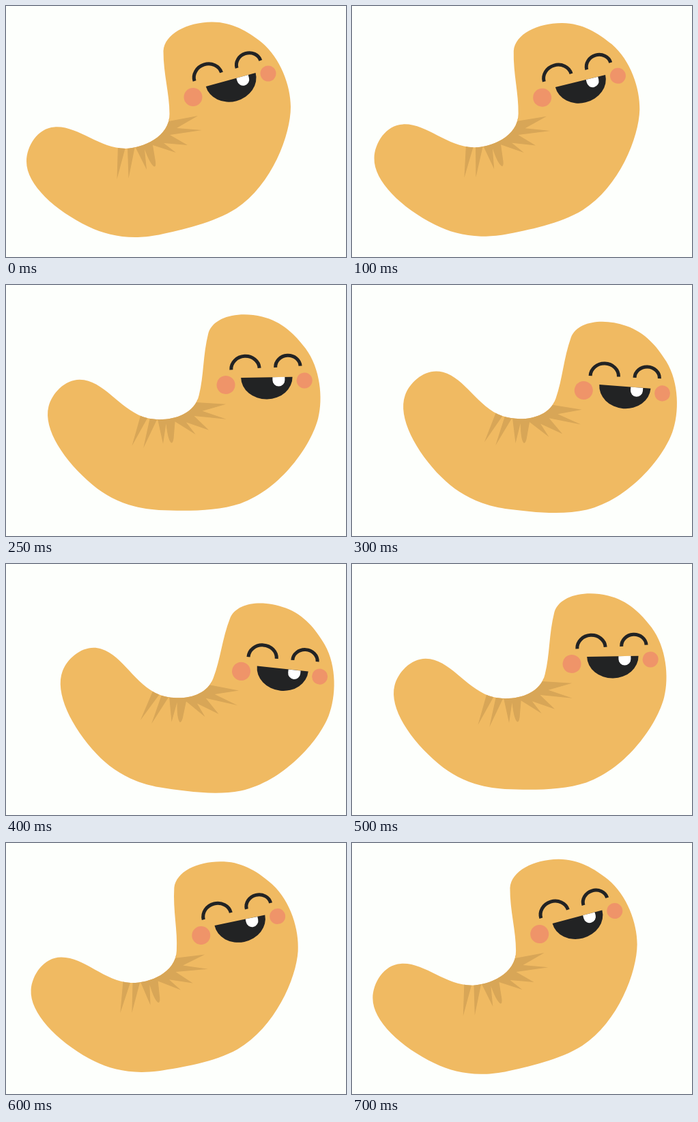
An HTML page for the animation above (0.75 s loop, 498x368 px).

```html
<!DOCTYPE html>
<html lang="en">
<head>
<meta charset="utf-8">
<title>Rocking cashew</title>
<style>
  html, body { margin: 0; width: 100%; height: 100%; overflow: hidden; background: #fdfffc; }
  svg { display: block; width: 100%; height: 100%; }
  .eye { fill: none; stroke: #222324; stroke-width: 5; }
  .cheek { fill: #ef9469; }
</style>
</head>
<body>
<svg viewBox="0 0 498 368">
  <defs>
    <path id="body" d="M230.5 66 C232 41 265 24 301 23.5 C330 23 354 37 374 53
      C402 76 417 117 417 148 C417 188 390 262 337 297 C304 318 258 328 224 335.5
      C210 338 200 339 189 339 C163 339 141 333 121 323.5 C72 300 30 262 30 228
      C30 206 46 179 71 177.5 C105 175 136 209 175 209
      C200 208.5 240 192 239.5 158 C239.5 128 230.5 100 230.5 66Z"/>
    <clipPath id="skin"><use href="#body"/></clipPath>
  </defs>
  <g id="cashew">
    <use href="#body" fill="#f0ba62"/>
    <path clip-path="url(#skin)" fill="#d8a657" d="M164 203 L162.5 254 L174.5 209 L178 208 L179.5 253
      L188.5 208 L190 208 L206 240 L203 210 Q211 232 217 235.5 Q220 236 219 228 L215 204 L249 215 L231 201
      L266 204 L240 189 L287 182 L250 179 L281 161 L238 169 L240 164 L225 178 L200 198Z"/>
    <circle class="cheek" cx="274" cy="133.5" r="13.5"/>
    <circle class="cheek" cx="384" cy="99" r="11.5"/>
    <path class="eye" transform="translate(295.8 103.8) rotate(-17.7)" d="M-20.7 0 a20.7 18.7 0 0 1 41.4 0"/>
    <path class="eye" transform="translate(355.5 85.4) rotate(-17.7)" d="M-18.2 0 a18.2 16.5 0 0 1 36.4 0"/>
    <g transform="translate(329.2 108) rotate(-15.2)">
      <path fill="#222324" d="M-37.7 0 H37.7 A37.7 32.3 0 0 1 -37.7 0Z"/>
      <path fill="#fff" d="M8.5 0 V4.5 a9 9 0 0 0 18 0 V0Z"/>
    </g>
  </g>
</svg>
<script>
  const STEP = 50, COUNT = 15;
  // Tilt in degrees on the way right; the way back mirrors it.
  const tilt = [0, 0.2, 1.35, 3.4, 8, 14.2, 19.6, 21.3];
  const cashew = document.getElementById('cashew');

  function draw(now) {
    const k = Math.floor(now / STEP) % COUNT;
    cashew.setAttribute('transform', `rotate(${tilt[Math.min(k, COUNT - k)]} 246 333)`);
  }

  const start = performance.now();
  function tick() {
    draw(performance.now() - start);
    requestAnimationFrame(tick);
  }
  tick();
</script>
</body>
</html>
```
